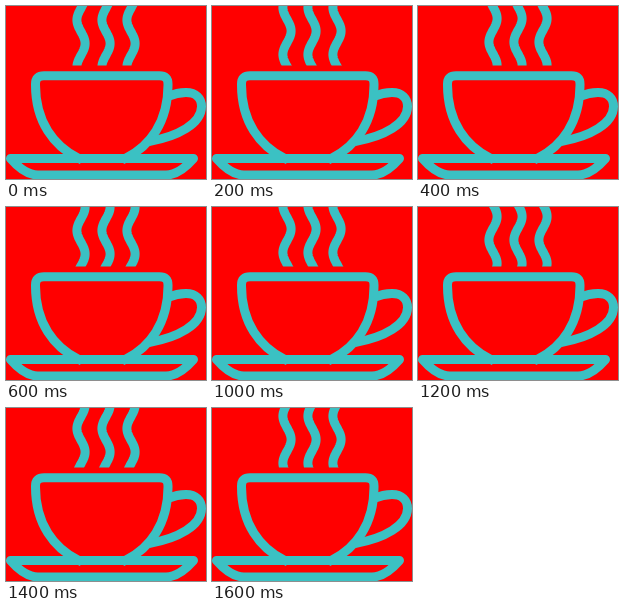
Recreate the animation shown at these times as an HTML page. Size 200x173 px, loop 1.8 s.

```html
<!DOCTYPE html>
<html lang="en">
<head>
<meta charset="utf-8">
<title>Hot cup</title>
<style>
html, body { margin: 0; width: 100%; height: 100%; overflow: hidden; background: #f00; }
svg { display: block; width: 200px; height: 173px; }
path { fill: none; stroke: #3bc1c3; stroke-width: 9; stroke-linejoin: round; }
</style>
</head>
<body>
<svg viewBox="0 0 200 173">
  <clipPath id="vent"><rect x="60" y="0" width="80" height="59.5"/></clipPath>
  <g clip-path="url(#vent)"><g id="steam"></g></g>
  <path d="M76 154L72 152C48 140 29.500 116 29.500 79V78Q29.500 69.800 38 69.800H153.500Q162 69.800 162 78V79C162 116 144 140 120 152L116 154"/>
  <path d="M162 90.500Q171 86.500 180 86.500C190 86.500 195.500 92.500 195.500 100.500C195.500 117.500 172 130.500 143 135.500"/>
  <path d="M4.500 152.500H187.500C181 160 171 169 160 169H32C21 169 11 160 4.500 152.500Z"/>
</svg>
<script>
const STEP = 200, FRAMES = 9;
const WAVE = 47, SWING = 4.1, RISE = 12.5;
const steam = document.getElementById('steam');

function strand(x) {
  const points = [];
  for (let y = -WAVE; y <= 2.5 * WAVE; y++) {
    const dx = -SWING * Math.cos((y - 14) / WAVE * 2 * Math.PI);
    points.push(`${(x + dx).toFixed(2)} ${y}`);
  }
  return `<path d="M${points.join('L')}"/>`;
}

function draw(now) {
  const frame = Math.floor(Math.max(0, now - start) / STEP) % FRAMES;
  steam.setAttribute('transform', `translate(0 ${-(frame * RISE % WAVE)})`);
  requestAnimationFrame(draw);
}

steam.innerHTML = [75, 100, 125].map(strand).join('');
const start = performance.now();
draw(start);
</script>
</body>
</html>
```
